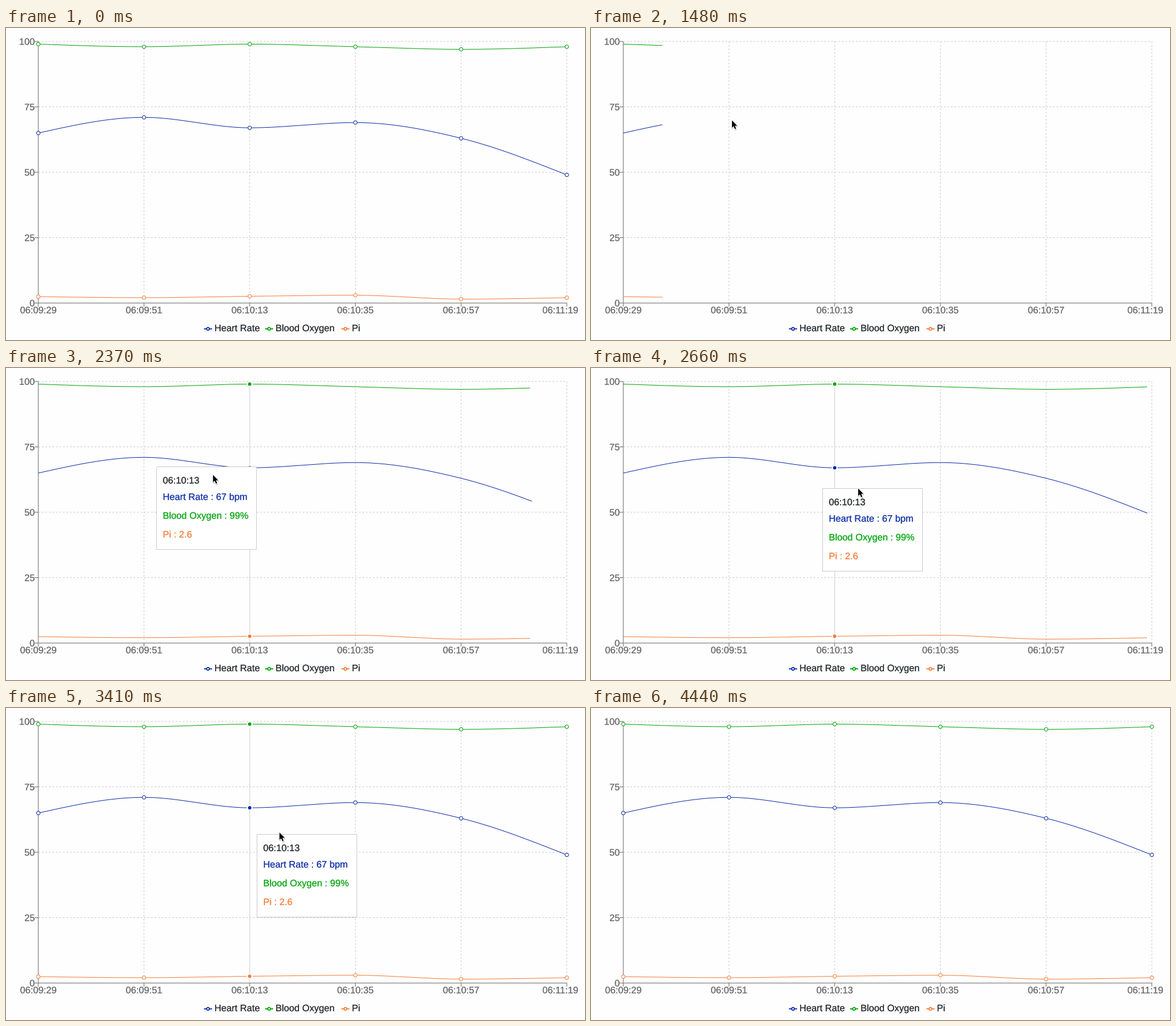
A matplotlib script that plays this animation: 986x532 px, repeating every 4590 ms.

```python
import numpy as np
import matplotlib.pyplot as plt
from matplotlib.animation import FuncAnimation
from matplotlib.patches import Circle, Polygon, Rectangle
from matplotlib.patheffects import Stroke, withStroke

WIDTH, HEIGHT, DPI = 986, 532, 64
PX = 72 / DPI  # points per pixel
LOOP_MS, INTERVAL = 4590, 30
STEP = LOOP_MS / 31  # the picture refreshes only this often

LEFT, RIGHT, TOP, BOTTOM = 55, 955, 23, 469
TICK_X = np.linspace(LEFT, RIGHT, 6)
TIMES = [f"06:{9 + s // 60:02}:{s % 60:02}" for s in range(29, 140, 22)]
PAPER, INK, MUTED, GRID = "#fefefe", "#212529", "#666666", "#cccccc"

# name, unit, color, values, legend icon x
SERIES = [
    ("Heart Rate", " bpm", "#0d2da6", [65, 71, 67, 69, 63, 49], 337),
    ("Blood Oxygen", "%", "#00a40a", [99, 98, 99, 98, 97, 98], 441),
    ("Pi", "", "#f57c38", [2.45, 2.05, 2.6, 3, 1.5, 2.05], 571),
]

# reload of the page, chart back, lines drawn, tooltip shown, pointer gone
RELOAD, LOADED = 880, 1470
DRAW_START, DRAW_MS = 1352, 1500
TIP_ON, TIP_OFF, POINTER_OFF = 1770, 3990, 4400

# key points of the two paths: ms, x, y
POINTER_PATH = [(890, 93, 9), (1040, 203, 117), (1190, 238, 156), (1480, 240, 157),
                (1920, 252, 159), (2220, 300, 170), (2660, 455, 205), (3260, 455, 205),
                (3410, 466, 212), (3700, 772, 412), (4000, 852, 507), (4290, 924, 530)]
TIP_PATH = [(1780, 121, 88), (1920, 211, 151), (2220, 224, 159), (2510, 286, 177),
            (2660, 393, 205), (2810, 421, 213), (2960, 425, 214), (3550, 428, 215),
            (3850, 500, 240)]
ARROW = np.array([(0, 0), (0, 12.6), (2.9, 9.9), (5, 14.8), (7.1, 13.9),
                  (5, 9.2), (8.9, 9)])

plt.rcParams["font.family"] = "Liberation Sans"
fig = plt.figure(figsize=(WIDTH / DPI, HEIGHT / DPI), dpi=DPI, facecolor=PAPER)
ax = fig.add_axes([0, 0, 1, 1])
ax.set(xlim=(0, WIDTH), ylim=(HEIGHT, 0))
ax.axis("off")


def to_y(value):
    return BOTTOM - np.asarray(value, float) * (BOTTOM - TOP) / 100


def line(xs, ys, color, z, width=1, **style):
    return ax.plot(xs, ys, color=color, lw=width * PX, zorder=z, snap=False,
                   solid_capstyle="butt", dash_capstyle="butt", **style)[0]


def cover_line(xs, ys, color, z):
    """Line that blanks out the grid dashes below it."""
    rim = withStroke(linewidth=2 * PX, foreground=PAPER)
    return line(xs, ys, color, z, path_effects=[rim])


def dot(x, y, radius, stroke, fill, edge, z):
    return ax.add_patch(Circle((x, y), radius, fc=fill, ec=edge, lw=stroke * PX,
                               zorder=z, snap=False))


def text(x, y, label, color, z=2, ha="left"):
    weight = Stroke(linewidth=0.3 * PX, foreground=color)
    return ax.text(x, y, label, color=color, fontsize=16 * PX, ha=ha,
                   va="baseline", zorder=z, path_effects=[weight])


def along(path, now):
    ms, xs, ys = np.transpose(path)
    return np.array([np.interp(now, ms, xs), np.interp(now, ms, ys)])


def ease(share):
    """CSS 'ease', cubic-bezier(.25, .1, .25, 1)."""
    u = np.linspace(0, 1, 201)
    a, b = 3 * (1 - u)**2 * u, 3 * (1 - u) * u**2
    return np.interp(share, 0.25 * a + 0.25 * b + u**3, 0.1 * a + b + u**3)


def monotone_curve(xs, ys, samples=80):
    """Monotone cubic through evenly spaced points."""
    step = xs[1] - xs[0]
    slope = np.diff(ys) / step
    a, b = slope[:-1], slope[1:]
    inner = (np.sign(a) + np.sign(b)) * np.minimum(
        np.minimum(abs(a), abs(b)), abs(a + b) / 4)
    tangent = np.concatenate([[(3 * slope[0] - inner[0]) / 2], inner,
                              [(3 * slope[-1] - inner[-1]) / 2]]) * step
    u = np.linspace(0, len(ys) - 1, samples * (len(ys) - 1) + 1)
    i = np.minimum(u.astype(int), len(ys) - 2)
    f = u - i
    y = ((2 * f**3 - 3 * f**2 + 1) * ys[i] + (f**3 - 2 * f**2 + f) * tangent[i]
         + (3 * f**2 - 2 * f**3) * ys[i + 1] + (f**3 - f**2) * tangent[i + 1])
    return xs[0] + u * step, y


def cut(x, y, share):
    """Leading part of a polyline, by share of its length."""
    length = np.concatenate([[0], np.cumsum(np.hypot(np.diff(x), np.diff(y)))])
    end = share * length[-1]
    n = np.searchsorted(length, end, side="right")
    return (np.append(x[:n], np.interp(end, length, x)),
            np.append(y[:n], np.interp(end, length, y)))


def build_chart():
    parts = []
    for value in range(0, 101, 25):
        y = float(to_y(value))
        parts += [line([LEFT, RIGHT], [y, y], GRID, 1, ls=(0, (3, 3))),
                  line([LEFT - 6, LEFT], [y, y], MUTED, 2.5),
                  text(LEFT - 6, y + 5.7, str(value), MUTED, ha="right")]
    for x, label in zip(TICK_X, TIMES):
        parts += [line([x, x], [TOP, BOTTOM], GRID, 1, ls=(0, (3, 3))),
                  line([x, x], [BOTTOM, BOTTOM + 6], MUTED, 2.5),
                  text(min(x, 944), BOTTOM + 17.4, label, MUTED, ha="center")]
    parts += [cover_line([LEFT, LEFT], [TOP, BOTTOM], MUTED, 2),
              cover_line([LEFT, RIGHT], [BOTTOM, BOTTOM], MUTED, 2)]
    for name, _, color, _, x in SERIES:
        parts += [line([x, x + 14], [513, 513], color, 2, 1.75),
                  dot(x + 7, 513, 2.33, 1.75, "white", color, 3),
                  text(x + 18, 517, name, INK)]
    return parts


chart = build_chart()
active_line = cover_line([], [], GRID, 1.5)
curves, markers, active_dots = [], [], []
for _, _, color, values, _ in SERIES:
    ys = to_y(values)
    curves.append((line([], [], color, 4), *monotone_curve(TICK_X, ys)))
    markers += [dot(x, y, 3, 1, "white", color, 5) for x, y in zip(TICK_X, ys)]
    active_dots.append(dot(0, 0, 4, 2, color, "white", 6))

tip_box = ax.add_patch(Rectangle((0, 0), 170, 141, fc="white", ec=GRID, lw=PX,
                                 zorder=7, snap=False))
tip_title = text(0, 0, "", INK, 8)
tip_rows = [text(0, 0, "", color, 8) for _, _, color, _, _ in SERIES]

# shadow, white rim, black body
pointer = [(Polygon(ARROW, fc="black", ec="black", lw=2 * PX, alpha=0.2, zorder=9), (0.4, 1.5)),
           (Polygon(ARROW, fc="white", ec="white", lw=2 * PX, zorder=10), (0, 0)),
           (Polygon(ARROW, fc="black", lw=0, zorder=11), (0, 0))]
for shape, _ in pointer:
    ax.add_patch(shape)


def show(artists, visible):
    for artist in artists:
        artist.set_visible(visible)


def place_tooltip(corner, active):
    x, y = np.round(corner)
    at = TICK_X[active]
    tip_box.set_xy((x + 0.5, y + 0.5))
    tip_title.set_position((x + 11, y + 29))
    tip_title.set_text(TIMES[active])
    active_line.set_data([at, at], [TOP, BOTTOM])
    for i, (name, unit, _, values, _) in enumerate(SERIES):
        tip_rows[i].set_position((x + 11, y + 57 + 32 * i))
        tip_rows[i].set_text(f"{name} : {values[active]:g}{unit}")
        active_dots[i].center = at, float(to_y(values[active]))


def update(frame):
    now = int(((frame + 1) * INTERVAL - 1) / STEP) * STEP
    spot = along(POINTER_PATH, now)

    loaded = now < RELOAD or now >= LOADED
    drawing = RELOAD <= now < DRAW_START + DRAW_MS
    share = ease((now - DRAW_START) / DRAW_MS) if drawing else 1
    show(chart + [c[0] for c in curves], loaded)
    show(markers, not drawing)
    for curve, x, y in curves:
        curve.set_data(*cut(x, y, share))

    hovering = TIP_ON <= now < TIP_OFF
    show([tip_box, tip_title, active_line, *tip_rows, *active_dots], hovering)
    if hovering:
        nearest = round((spot[0] - LEFT) / (TICK_X[1] - LEFT))
        place_tooltip(along(TIP_PATH, now), nearest)

    show([shape for shape, _ in pointer], RELOAD <= now < POINTER_OFF)
    for shape, shift in pointer:
        shape.set_xy(ARROW + spot + shift + (0, 0.5))
    return []


anim = FuncAnimation(fig, update, frames=LOOP_MS // INTERVAL, interval=INTERVAL,
                     repeat=True, repeat_delay=0, init_func=lambda: update(0))
plt.show()
```
